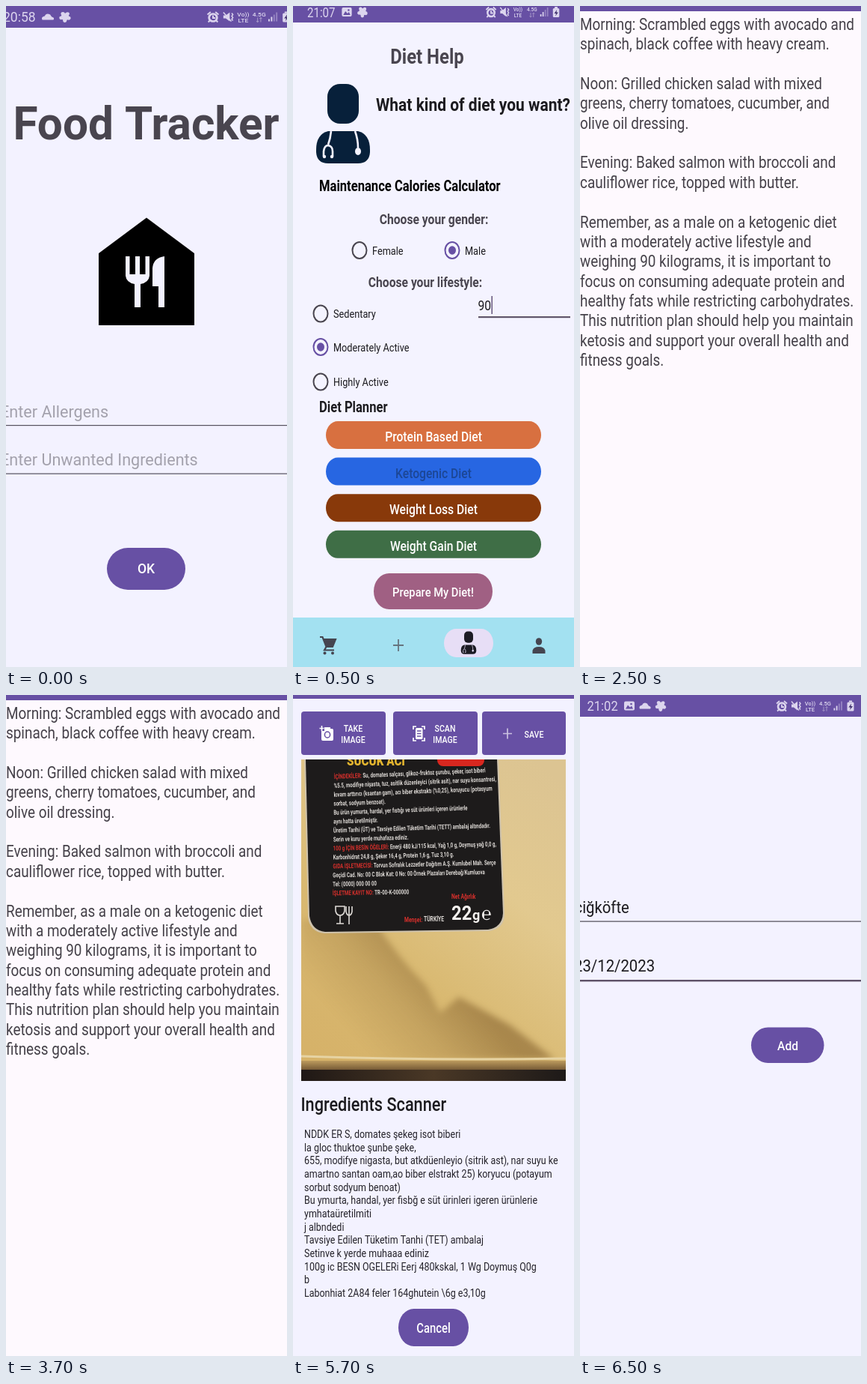
Animation of 376x882 px, one loop 8000 ms. Source, as an HTML page with a canvas:

```html
<!DOCTYPE html>
<html lang="en">
<head>
<meta charset="utf-8">
<title>Food Tracker</title>
<style>
html, body { margin: 0; width: 100%; height: 100%; overflow: hidden; background: #f3f2ff; }
canvas { display: block; width: 376px; height: 882px; }
</style>
</head>
<body>
<canvas id="stage"></canvas>
<script>
const W = 376, H = 882, LOOP = 8000;
const PURPLE = '#6750a4', BG = '#f3f2ff', INK = '#1c1b1f', GREY = '#49454f';
const canvas = document.getElementById('stage');
const dpr = window.devicePixelRatio || 1;
canvas.width = W * dpr;
canvas.height = H * dpr;
const ctx = canvas.getContext('2d');
let aspect = 1; // horizontal squeeze of the current screen

function rect(x, y, w, h, color) {
  ctx.fillStyle = color;
  ctx.fillRect(x, y, w, h);
}
function pill(x, y, w, h, color, r = { x: h / 2 * aspect, y: h / 2 }) {
  ctx.fillStyle = color;
  ctx.beginPath();
  ctx.roundRect(x, y, w, h, r);
  ctx.fill();
}
function shape(d, color) {
  ctx.fillStyle = color;
  ctx.fill(new Path2D(d));
}
function stroke(d, color, width = 2) {
  ctx.strokeStyle = color;
  ctx.lineWidth = width;
  ctx.stroke(new Path2D(d));
}
function dot(x, y, rx, color, ry = rx) {
  ctx.fillStyle = color;
  ctx.beginPath();
  ctx.ellipse(x, y, rx, ry, 0, 0, 7);
  ctx.fill();
}
function ring(x, y, rx, color, width = 2, ry = rx) {
  ctx.strokeStyle = color;
  ctx.lineWidth = width;
  ctx.beginPath();
  ctx.ellipse(x, y, rx, ry, 0, 0, 7);
  ctx.stroke();
}
function at(x, y, sx, sy, draw) {
  ctx.save();
  ctx.translate(x, y);
  ctx.scale(sx, sy);
  draw();
  ctx.restore();
}
// Returns the drawn width in stage pixels.
function text(str, x, y, size, color = INK, weight = 400, align = 'left') {
  ctx.font = `${weight} ${size}px Roboto, sans-serif`;
  ctx.textAlign = align;
  ctx.fillStyle = color;
  at(x, y, aspect, 1, () => ctx.fillText(str, 0, 0));
  return ctx.measureText(str).width * aspect;
}
function screen(squeeze, bg, barHeight) {
  aspect = squeeze;
  rect(0, 0, W, H, bg);
  rect(0, 0, W, barHeight, PURPLE);
}

// ---- status bar ----
const PALE = '#dcd5ee';
const statusIcons = {
  picture() {
    pill(-7, -6, 14, 12, PALE, 2);
    shape('M-5 4L-2 -1L1 2L3 0L5 4Z', PURPLE);
    dot(2.5, -2.5, 1.3, PURPLE);
  },
  cloud() {
    shape('M-7 4Q-9 0 -4 -1Q-2 -6 3 -3Q4 -1 5 0Q9 1 7 4Z', PALE);
  },
  leaf() {
    dot(0, 0, 5, PALE);
    for (let i = 0; i < 5; i++) {
      const a = i * Math.PI * 0.4 - 0.9;
      dot(Math.cos(a) * 5, Math.sin(a) * 5, 2.4, PALE);
    }
  }
};
function tinyText(a, b, x, y) {
  text(a, x, y - 1, 8, PALE, 500, 'center');
  text(b, x, y + 7, 8, PALE, 500, 'center');
}
function status(time, timeX, y, icons, alarmX, k) {
  text(time, timeX, y + 6.5, 17.5, PALE);
  for (const [name, x] of icons) at(x, y, k, 1, statusIcons[name]);
  at(alarmX, y, k, 1, () => {
    ring(0, 1, 5, PALE, 2.6);
    stroke('M0 -2V1.5H3M-7 -3L-3 -6.5M7 -3L3 -6.5M-4 5L-6 7M4 5L6 7', PALE, 1.8);
    shape('M13 -2H16L21 -6V6L16 2H13Z', PALE);
    stroke('M13 -6L23 6M23.5 -5L25 -3L23.5 -1L25 1L23.5 3L25 5', PALE, 1.4);
    tinyText('Vo))', 'LTE', 38, 0);
    text('4.5G', 58, -1, 8, PALE, 500, 'center');
    stroke('M56 1V7M54.5 5.5L56 7L57.5 5.5M60 7V1M58.5 2.5L60 1L61.5 2.5', '#a596c8', 1);
    for (let i = 0; i < 4; i++)
      rect(69.5 + i * 3.2, 6 - (i + 1) * 3, 1.8, (i + 1) * 3, i < 2 ? PALE : '#9684c2');
    pill(87.5, -5, 9, 12, PALE, 1.5);
    rect(90, -7, 4, 2, PALE);
    shape('M93 -3L89.5 2H92L91 5.5L95 0.5H92.5Z', '#3d2d6b');
  });
}

// ---- welcome ----
function welcome() {
  screen(1, BG, 29);
  status('20:58', -4, 14.5, [['cloud', 56], ['leaf', 79]], 277, 1.065);
  text('Food Tracker', 187.5, 177.5, 60.3, GREY, 700, 'center');
  shape('M188 282.5L252 330V426H124V330Z', '#000');
  shape('M160 334H165.5V358H173V334H179V358H186.5V334H192V360Q191 369 180 371V402H172V371Q161 369 160 360Z', BG);
  shape('M212 334V402H204V374H196V350Q197 336 212 334Z', BG);
  text('Enter Allergens', -8, 548.5, 21.6, '#a3a1ac');
  text('Enter Unwanted Ingredients', -8, 613, 21.6, '#a3a1ac');
  rect(0, 559, W, 1.2, '#55525e');
  rect(0, 623.5, W, 1.2, '#55525e');
  pill(135, 723, 105, 56, PURPLE);
  text('OK', 187.5, 757, 17.5, '#fff', 500, 'center');
}

// ---- diet ----
function doctor(skin, line) {
  pill(-21, -54, 42, 53, skin, 17);
  shape('M-36 37V34Q-36 13 -20 9H20Q36 13 36 34V37Q35 52 20 52H-20Q-35 52 -36 37Z', skin);
  stroke('M-16 9Q-17 19 -20 27M-26 43V36Q-25 28 -20 28Q-14 29 -14 36V43M16 9Q20 20 20 31', line, 2.6);
  dot(-25, 43, 2.2, line);
  dot(-15, 43, 2.2, line);
  dot(20, 36, 4, line, 5);
}
function radio(label, x, y, labelX, on) {
  ring(x, y, 9.5, on ? PURPLE : GREY, 2, 11);
  if (on) dot(x, y, 5, PURPLE, 5.8);
  text(label, labelX, y + 5.7, 14.8);
}
function diet() {
  screen(0.86, '#f4f3ff', 22);
  status('21:07', 19, 8, [['picture', 72], ['leaf', 93]], 265, 0.946);
  text('Diet Help', 179.5, 76.5, 27.8, GREY, 700, 'center');
  at(67, 158, 1, 1, () => doctor('#07203a', '#f4f3ff'));
  text('What kind of diet you want?', 111, 140, 24.4, INK, 700);
  text('Maintenance Calories Calculator', 35, 246.5, 19.3, '#000', 700);
  text('Choose your gender:', 188.5, 290.5, 18.2, GREY, 700, 'center');
  radio('Female', 89, 326, 106, false);
  radio('Male', 213, 326, 230, true);
  text('Choose your lifestyle:', 177, 374.5, 18.2, GREY, 700, 'center');
  radio('Sedentary', 37, 410.5, 54, false);
  radio('Moderately Active', 37, 455, 54, true);
  radio('Highly Active', 37, 501.5, 54, false);
  text('90', 247.5, 406, 18.2);
  rect(265.5, 387, 1.4, 24, '#5a4a72');
  rect(248, 414, 123, 2.2, '#61566a');
  text('Diet Planner', 35, 541.5, 19.3, INK, 700);
  [['Protein Based Diet', '#d87040', '#fff'], ['Ketogenic Diet', '#2766e2', '#1c4796'],
   ['Weight Loss Diet', '#88390a', '#fff'], ['Weight Gain Diet', '#3f6e46', '#fff']
  ].forEach(([label, color, ink], i) => {
    const y = 554 + i * 48.6;
    pill(44, y, 288, 37, color);
    text(label, 188, y + 27, 18.2, ink, 500, 'center');
  });
  pill(108, 757, 159, 48, '#a06083');
  text('Prepare My Diet!', 187.5, 788, 17.1, '#fff', 500, 'center');
  navBar();
}
function navBar() {
  rect(0, 816, W, 66, '#a3e1f1');
  pill(202, 831, 66, 38, '#e7def6');
  const ink = '#454550';
  stroke('M36 842H39.5L44.5 855H53L57 845H41.5M44.5 855L42 859.5H55', ink, 2.2);
  shape('M41 845H57L53 855H45Z', ink);
  dot(42.5, 863.5, 2, ink);
  dot(53, 863.5, 2, ink);
  stroke('M141 845V861M134 853H148', '#66747e', 1.8);
  at(235, 850, 0.285, 0.285, () => doctor('#1c1b24', '#e7def6'));
  dot(329, 848, 4.2, ink, 4.8);
  shape('M320.5 864V860Q322 855 329 855Q336 855 337.5 860V864Z', ink);
}

// ---- plan ----
const plan = `Morning: Scrambled eggs with avocado and
spinach, black coffee with heavy cream.

Noon: Grilled chicken salad with mixed
greens, cherry tomatoes, cucumber, and
olive oil dressing.

Evening: Baked salmon with broccoli and
cauliflower rice, topped with butter.

Remember, as a male on a ketogenic diet
with a moderately active lifestyle and
weighing 90 kilograms, it is important to
focus on consuming adequate protein and
healthy fats while restricting carbohydrates.
This nutrition plan should help you maintain
ketosis and support your overall health and
fitness goals.`.split('\n');
function mealPlan() {
  screen(0.84, '#fef9fe', 7);
  plan.forEach((line, i) => text(line, 0, 32 + i * 26.35, 22.5, '#454149'));
}

// ---- scanner ----
const scan = `NDDK ER S, domates şekeg isot biberi
la gloc thuktoe şunbe şeke,
655, modifye nigasta, but atkdüenleyio (sitrik ast), nar suyu ke
amartno santan oam,ao biber elstrakt 25) koryucu (potayum
sorbut sodyum benoat)
Bu ymurta, handal, yer fisbğ e süt ürinleri igeren ürünlerie
ymhataüretilmiti
j albndedi
Tavsiye Edilen Tüketim Tanhi (TET) ambalaj
Setinve k yerde muhaaa ediniz
100g ic BESN OGELERi Eerj 480kskal, 1 Wg Doymuş Q0g
b
Labonhiat 2A84 feler 164ghutein \\6g e3,10g`.split('\n');
// Text before "|" is printed in red.
const label = `İÇİNDEKİLER:| Su, domates salçası, glikoz-fruktoz şurubu, şeker, isot biberi
%5.5, modifiye nişasta, tuz, asitlik düzenleyici (sitrik asit), nar suyu konsantresi,
kıvam arttırıcı (ksantan gam), acı biber ekstraktı (%0,25), koruyucu (potasyum
sorbat, sodyum benzoat).
Bu ürün yumurta, hardal, yer fıstığı ve süt ürünleri içeren ürünlerle
aynı hatta üretilmiştir.
Üretim Tarihi (ÜT) ve Tavsiye Edilen Tüketim Tarihi (TETT) ambalaj altındadır.
Serin ve kuru yerde muhafaza ediniz.
100 g İÇİN BESİN ÖĞELERİ:| Enerji 480 kJ/115 kcal, Yağ 1,0 g, Doymuş yağ 0,0 g,
Karbonhidrat 24,8 g, Şeker 16,4 g, Protein 1,6 g, Tuz 3,10 g.
GIDA İŞLETMECİSİ:| Torvun Sofralık Lezzetler Dağıtım A.Ş. Kumlubel Mah. Serçe
Geçidi Cad. No: 00 C Blok Kat: 0 No: 00 Örnek Plazaları Derebağ/Kumluova
Tel: (0000) 000 00 00
İŞLETME KAYIT NO:| TR-00-K-000000`.split('\n');
const RED = '#d8302c', PRINT = '#dedad6';

function gradient(x0, y0, x1, y1, ...colors) {
  const g = ctx.createLinearGradient(x0, y0, x1, y1);
  colors.forEach((c, i) => g.addColorStop(i / (colors.length - 1), c));
  return g;
}
function packet() {
  const squeeze = aspect;
  shape('M15 86H275L283 292Q283 312 262 315L42 318Q22 316 20 296Z', '#cfc3ac');
  shape('M17 86H273L281 291Q280 310 261 313L43 316Q25 314 22 295Z', '#1d1b1b');
  aspect = 0.8;
  text('SUCUK ACI', 72, 94, 19, '#e3b52f', 800);
  pill(193, 70, 63, 25, '#d8271f', 8);
  aspect = 0.69;
  label.forEach((line, i) => {
    ctx.save();
    ctx.translate(55 - i * 0.15, 112 + i * 11.95);
    ctx.rotate(-0.043 + i * 0.002);
    const [head, tail] = line.includes('|') ? line.split('|') : ['', line];
    const w = head ? text(head, 0, 0, 8.8, RED, 600) : 0;
    text(tail, w, 0, 8.8, PRINT, 600);
    ctx.restore();
  });
  aspect = 0.75;
  text('Net Ağırlık', 212, 272, 9, RED, 700);
  text('Menşei:', 149, 303, 9, RED, 700);
  text('TÜRKİYE', 175, 302, 9, PRINT, 700);
  aspect = 0.95;
  text('22', 212, 300, 25, '#f4f1ee', 700);
  text('g', 240, 300, 19, '#f4f1ee', 700);
  text('℮', 251, 300, 25, '#f4f1ee', 500);
  stroke('M57 282H69V288Q68 294 63 294Q58 294 57 288ZM63 294V305M58 305H68M75 294V306M71 282V289Q72 294 75 294Q78 294 79 289V282M75 282V294', PRINT, 1.6);
  aspect = squeeze;
}
function photo() {
  ctx.save();
  ctx.beginPath();
  ctx.rect(11, 86, 354, 429);
  ctx.clip();
  rect(11, 86, 354, 429, gradient(365, 120, 60, 500, '#dcc492', '#e2c98f', '#d9b971', '#d6b269'));
  ctx.filter = 'blur(4px)';
  shape('M11 300H108Q140 350 178 388L197 424L222 403L290 440L350 486H11Z',
    gradient(215, 380, 105, 480, 'rgba(120,84,36,.5)', 'rgba(120,84,36,.2)', 'rgba(120,84,36,0)'));
  ctx.filter = 'none';
  stroke('M11 482Q190 488 365 485', '#e6d3a3', 3);
  rect(11, 488, 354, 14, gradient(0, 487, 0, 502, '#c2a061', '#6b5030'));
  rect(11, 500, 354, 15, gradient(11, 0, 365, 0, '#1f1815', '#4a3826', '#1d1918'));
  packet();
  ctx.restore();
}
function scanner() {
  screen(0.825, BG, 5);
  for (const [x, w] of [[11, 113], [134, 113], [253, 112]]) pill(x, 22, w, 58, PURPLE, 4);
  [['TAKE', 80.5, 49], ['IMAGE', 80.5, 64], ['SCAN', 203.5, 49], ['IMAGE', 203.5, 64], ['SAVE', 322.5, 56.5]]
    .forEach(([s, x, y]) => text(s, x, y, 12.8, '#fff', 500, 'center'));
  pill(38, 45, 16, 16, '#fff', 2);
  rect(42, 43, 8, 4, '#fff');
  ring(46, 53, 3.6, PURPLE, 1.6, 4);
  rect(35, 40, 7, 8, PURPLE);
  stroke('M38.5 41V48M35.5 44.5H41.5', '#fff', 1.6);
  stroke('M161 46V42H165M172 42H176V46M176 57V61H172M165 61H161V57', '#fff', 1.7);
  pill(164, 44, 9.5, 15, '#fff', 1.5);
  stroke('M166 48H171.5M166 51.5H171.5M166 55H171.5', PURPLE, 1.3);
  stroke('M287 44.5V58.5M281 51.5H293', '#c9c0e0', 1.7);
  photo();
  text('Ingredients Scanner', 10.5, 554.5, 26.3, INK, 500);
  scan.forEach((line, i) => text(line, 15, 591 + i * 17.67, 15.1, '#25232a'));
  pill(141, 819, 94, 50, PURPLE);
  text('Cancel', 188, 851, 18, '#fff', 500, 'center');
}

// ---- add item ----
function addItem() {
  screen(0.945, BG, 29);
  status('21:02', 9.5, 14.5, [['picture', 66], ['cloud', 87], ['leaf', 108]], 270, 1);
  text('çiğköfte', -7.5, 290.5, 21.5);
  rect(0, 301.5, W, 1.2, '#4e4a55');
  text('23/12/2023', -8, 369, 21.5);
  rect(0, 380, W, 2.4, '#5e5268');
  pill(229, 443.5, 97.5, 47.5, PURPLE);
  text('Add', 278, 474, 16.5, '#fff', 500, 'center');
}

const scenes = [[6500, addItem], [4500, scanner], [2500, mealPlan], [500, diet], [0, welcome]];
const start = performance.now();
function frame() {
  const t = (performance.now() - start) % LOOP;
  ctx.setTransform(dpr, 0, 0, dpr, 0, 0);
  scenes.find(([from]) => t >= from)[1]();
  requestAnimationFrame(frame);
}
frame();
</script>
</body>
</html>
```
